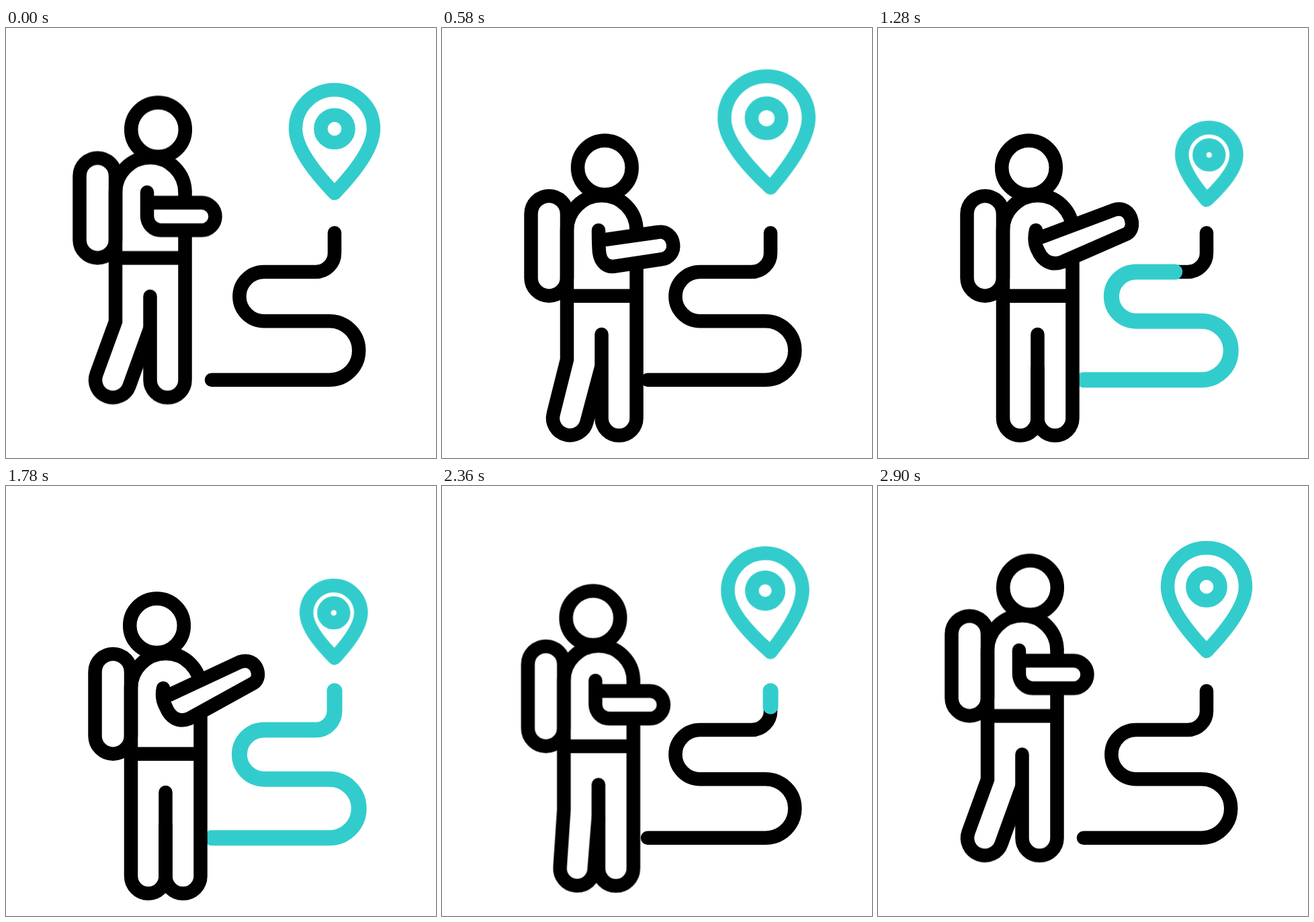
These frames come from a looping animation (640 by 640 pixels, 3.34 s). An HTML page without scripts:

```html
<!DOCTYPE html>
<html lang="en">
<head>
<meta charset="utf-8">
<title>Hiker and route</title>
<style>
html, body { margin: 0; width: 100%; height: 100%; overflow: hidden; background: #fff; }
svg { display: block; width: 100vw; height: 100vh; }
svg * {
  animation: 3340ms cubic-bezier(.37, 0, .63, 1) infinite;
}
path, circle, rect { fill: none; stroke: #000; stroke-width: 20.5; }
.round { stroke-linecap: round; stroke-linejoin: round; }

/* Hiker: drawn in the lowered pose, lifted at rest */
.man { animation-name: man; }
@keyframes man {
  0%, 5.99%, 81.2%, 100% { transform: translate(-23px, -56.5px); }
  16.77%, 66.23% { transform: none; }
}
.head { animation-name: head; }
@keyframes head {
  0%, 11.98%, 81.2%, 100% { transform: translateX(25px); }
  26.95%, 66.23% { transform: none; }
}
.back { animation-name: step; }
@keyframes step {
  0%, 11.98%, 81.2%, 100% {
    d: path("M289.5 301A51.75 51.75 0 0 0 186 301L186 493.5L157.6 571.6C152.7 585.1 159.6 600 173.1 604.9C186.6 609.8 201.5 602.9 206.4 589.4L237.5 503.5");
  }
  26.95%, 66.23% {
    d: path("M289.5 301A51.75 51.75 0 0 0 186 301L186 493.5L186 580.5C186 594.9 197.6 606.5 212 606.5C226.1 606.5 237.5 594.9 237.5 580.5L237.5 503.5");
  }
}
.arm { fill: #fff; animation-name: point; }
@keyframes point {
  0%, 11.98%, 68.86%, 100% {
    d: path("M233 301C233 313 233 324 233 336C233 348 242 357.5 254 357.5L314 357.5C325.3 357.5 334.5 348.3 334.5 337C334.5 325.7 325.3 316.5 314 316.5L233 316.5");
  }
  11.98% { animation-timing-function: ease-in; }
  17.37% {
    d: path("M233 301C233 310 233 322 234 334C236 349 245 357 259 354.5L327 344.5C338 342.8 345.6 333 344 322C342.5 310 333 302 322 304L237 316");
    animation-timing-function: ease-out;
  }
  28.74% {
    d: path("M229 303C231 312 236 325 243 334C250 344 262 347 274 340L361 268C366 262 366 253 362 246C358 238 346 234 335 241L242 310");
  }
  38.32% {
    d: path("M235 301C233 310 233 322 238 331C244 345 257 355 275 348L371 306C377 302 379 295 377.5 287C375 273 364 267 352 270.5L244 311");
  }
  53.29%, 55.09% {
    d: path("M234 301C232 310 233 320 238 329C244 344 256 353 273 346L369 293C375 289 376 281 374 274C370 262 359 258 348 262L243 311");
  }
}

/* Route: teal line runs in, then out at the far end */
.trail {
  stroke: #3cc; stroke-width: 23; stroke-dasharray: 1 2;
  animation-name: trail, show;
  animation-timing-function: linear, step-end;
}
@keyframes trail {
  0%, 18.68% { stroke-dashoffset: 1; }
  41.5%, 55.09% { stroke-dashoffset: 0; animation-timing-function: cubic-bezier(.3, .1, .7, .9); }
  71.86%, 100% { stroke-dashoffset: -1; }
}
@keyframes show {
  0%, 71.86%, 100% { visibility: hidden; }
  18.68% { visibility: visible; }
}

/* Pin: local origin at its tip */
.pin path, .pin circle { stroke: #3cc; vector-effect: non-scaling-stroke; }
.pin { animation-name: hop; }
@keyframes hop {
  0%, 5.99%, 75.75%, 100% { transform: translate(489px, 246px); }
  17.37%, 27.84% { transform: translate(489px, 238px); }
  35.93%, 55.09% { transform: translate(489px, 256px); }
}
.swing { animation-name: swing; }
@keyframes swing {
  0%, 5.99%, 55.09%, 86.83%, 100% { transform: rotate(0deg); }
  19.76% { transform: rotate(-3.5deg); }
  32.34% { transform: rotate(5.5deg); }
  50.3% { transform: rotate(-3.5deg); }
  63.02%, 78.89% { transform: rotate(5deg); }
  70.96% { transform: rotate(-5deg); }
}
.grow { animation-name: grow; }
@keyframes grow {
  0%, 5.99%, 75.75%, 100% { transform: scale(1); }
  5.99% { animation-timing-function: linear; }
  21.26% { transform: scale(1.095); }
  32.04%, 55.09% { transform: scale(.7); }
}
</style>
</head>
<body>
<svg viewBox="0 0 640 640">
  <defs>
    <path id="way" pathLength="1" style="fill:inherit;stroke:inherit;stroke-width:inherit"
      d="M306 523.7H481.5a43.75 43.75 0 0 0 0-87.5H384a36.6 36.6 0 0 1 0-73.2H461a28 28 0 0 0 28-28V305"/>
  </defs>
  <path class="round" d="M306 523.7H481.5a43.75 43.75 0 0 0 0-87.5H384a36.6 36.6 0 0 1 0-73.2H461a28 28 0 0 0 28-28V305"/>
  <path class="round trail" pathLength="1" d="M306 523.7H481.5a43.75 43.75 0 0 0 0-87.5H384a36.6 36.6 0 0 1 0-73.2H461a28 28 0 0 0 28-28V305"/>

  <g class="pin"><g class="swing"><g class="grow">
    <path class="round" d="M0 0C-13-14-58-60-58-96A58 58 0 0 1 58-96C58-60 13-14 0 0Z"/>
    <circle cy="-96" r="20.6"/>
  </g></g></g>

  <g class="man">
    <rect x="132.5" y="250" width="53.5" height="148.7" rx="26.75"/>
    <path class="back" d="M289.5 301A51.75 51.75 0 0 0 186 301L186 493.5L157.6 571.6C152.7 585.1 159.6 600 173.1 604.9C186.6 609.8 201.5 602.9 206.4 589.4L237.5 503.5"/>
    <path d="M186 398.7H289.5"/>
    <path class="round" d="M237.5 456V580.5a26 26 0 0 0 52 0V301"/>
    <circle class="head" cx="224.5" cy="207.8" r="40.3"/>
    <path class="round arm" d="M233 301C233 313 233 324 233 336C233 348 242 357.5 254 357.5L314 357.5C325.3 357.5 334.5 348.3 334.5 337C334.5 325.7 325.3 316.5 314 316.5L233 316.5"/>
  </g>
</svg>
</body>
</html>
```
